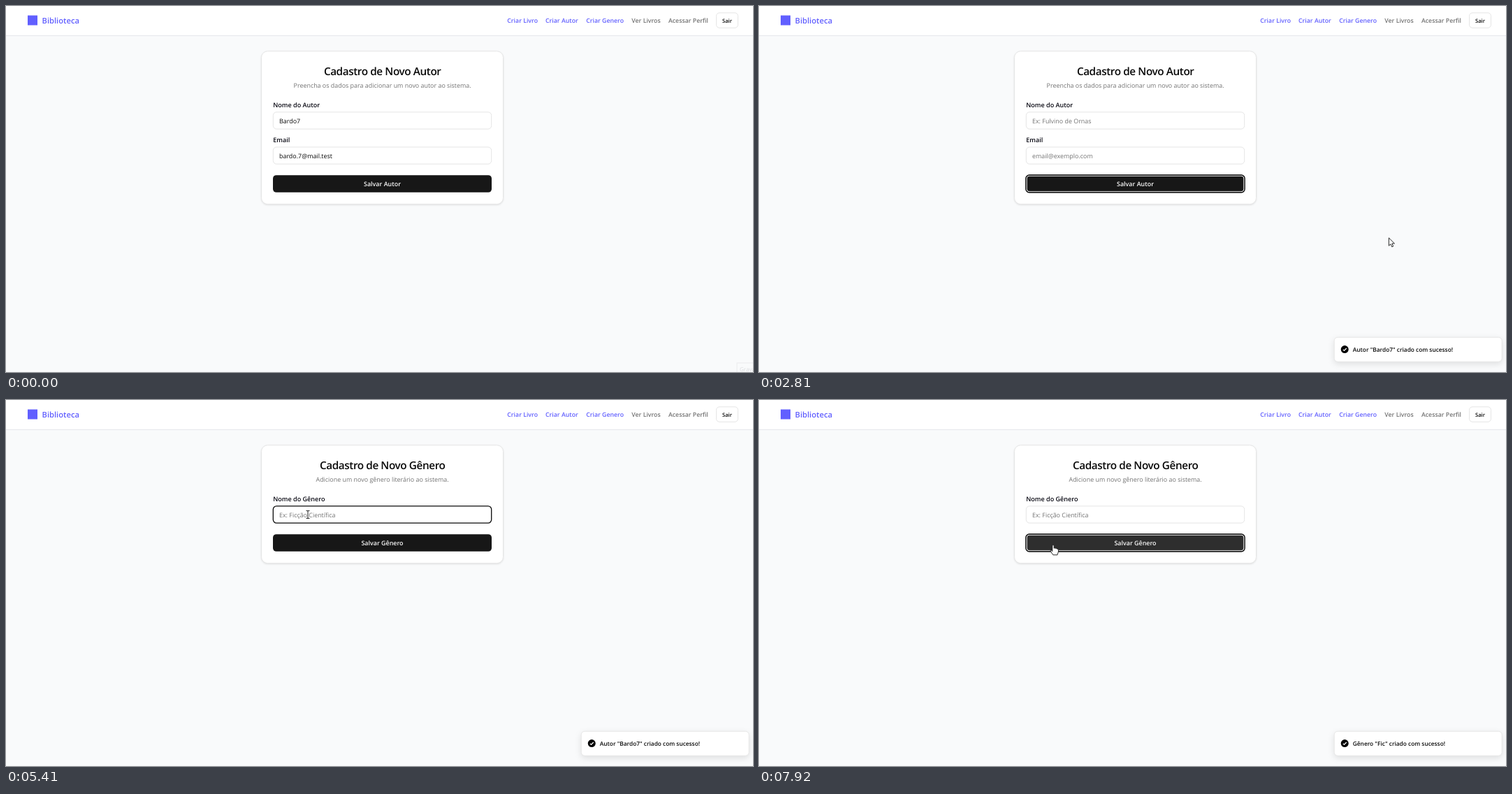
Write an HTML page that moves like this. It is 1069 px wide and 524 px high and loops after 7990 ms.

```html
<!DOCTYPE html>
<html lang="pt-BR">
<head>
<meta charset="utf-8">
<title>Biblioteca</title>
<style>
  html, body { margin: 0; width: 100%; height: 100%; overflow: hidden; background: #f9fafb; }
  svg { display: block; width: 1069px; height: 524px; }
  text {
    font: 400 8.92px "Open Sans", "Noto Sans", sans-serif;
    fill: #0a0a0a; text-rendering: geometricPrecision;
  }
  .bold, .nav text { font-weight: 600; }
  .mid { text-anchor: middle; }
  .brand { font-size: 11.2px; font-weight: 600; fill: #615fff; }
  .nav text { font-size: 8.75px; fill: #737373; }
  .nav .admin { fill: #615fff; }
  .nav .admin.hover { fill: #0a0a0a; }
  .nav .exit { font-size: 7.65px; fill: #0a0a0a; }
  .title { font-size: 15.3px; font-weight: 600; letter-spacing: -.41px; }
  .muted, .hint { fill: #737373; }
  .label { font-size: 9.05px; font-weight: 600; fill: #0a0a14; }
  .box { fill: #fff; stroke: #e5e5e5; }
  .box.focus { stroke: #0a0a0a; stroke-width: 1.3; }
  .card { filter: drop-shadow(0 1px 1.2px rgba(0, 0, 0, .1)); }
  .button { fill: #171717; }
  .button.hover { fill: #2e2e2e; }
  .light { fill: #fafafa; }
  .toast rect { filter: drop-shadow(0 3px 4px rgba(0, 0, 0, .1)); }
  .toast text, .popup text { font-size: 8.32px; font-weight: 600; }
  .popup { fill: #1c1b22; }
  .popup text { fill: #fbfbfe; }
  .status text { font-size: 7.64px; fill: #fbfbfe; }
  .tip rect { fill: #f9fafb; stroke: #ebecee; }
  .tip text { font-size: 8px; fill: #dcdde0; }
  .pointer path { fill: #fff; stroke: #111; stroke-width: .9; stroke-linejoin: round; }
  .pointer .beam { fill: none; stroke: #333; stroke-width: 1.1; }
</style>
</head>
<body>
<svg viewBox="0 0 1069 524">
  <rect width="1069" height="524" fill="#f9fafb"/>
  <rect width="1069" height="42" fill="#fff"/>
  <path d="M0 42.4H1069" stroke="#e5e7eb"/>
  <rect x="31" y="13.5" width="14" height="14" fill="#615fff"/>
  <text class="brand" x="51.5" y="24.8">Biblioteca</text>
  <g class="nav">
    <text class="admin" x="717.3" y="23.7">Criar Livro</text>
    <text class="admin" x="772" y="23.7">Criar Autor</text>
    <text class="admin" id="link" x="830.2" y="23.7">Criar Genero</text>
    <text x="895.3" y="23.7">Ver Livros</text>
    <text x="948" y="23.7">Acessar Perfil</text>
    <rect class="box" x="1016.5" y="9.8" width="31" height="21.5" rx="4.5"/>
    <text class="exit mid" x="1032" y="23.5">Sair</text>
  </g>

  <rect class="box card" id="card" x="365.5" y="64.7" width="346" height="219" rx="9"/>
  <text class="title mid" id="title" x="538.7" y="98.6"></text>
  <text class="muted mid" id="sub" x="538.6" y="117.2"></text>
  <text class="label" id="label" x="382.2" y="145"></text>
  <rect class="box" id="field" x="382.3" y="151.9" width="312.4" height="24.2" rx="4.8"/>
  <text id="value" x="391" y="167.8"></text>
  <rect id="caret" y="158" width="1" height="13"/>
  <g id="email">
    <text class="label" x="382.2" y="195">Email</text>
    <rect class="box" x="382.3" y="202" width="312.4" height="24.2" rx="4.8"/>
    <text id="mail" x="391" y="218"></text>
  </g>
  <g id="save">
    <rect class="button" id="button" x="382" y="242.2" width="313" height="24.6" rx="4.8"/>
    <g id="ring" fill="none">
      <rect x="383" y="243.2" width="311" height="22.6" rx="4" stroke="#fff" stroke-width="1.3"/>
      <rect x="381.8" y="242" width="313.4" height="25" rx="5" stroke="#0a0a0a" stroke-width="1.3"/>
    </g>
    <text class="bold mid light" id="action" x="538.5" y="257.8"></text>
  </g>

  <g class="popup" id="popup">
    <path d="M457 182.5l6-5.5 6 5.5z"/>
    <rect id="list" x="449" y="182" width="106" height="54.5" rx="2"/>
    <text x="457.3" y="200.2">Ficção Científica</text>
    <text x="457.3" y="224.8">Ficção CC</text>
  </g>

  <g class="toast" id="toast">
    <rect class="box" x="823.2" y="474.3" width="240" height="35" rx="5"/>
    <circle cx="838.2" cy="491.6" r="5.5"/>
    <path d="M835.8 491.8l1.7 1.7 3.2-3.5" fill="none" stroke="#fff" stroke-width="1.2"/>
    <text id="notice" x="849.8" y="495.4"></text>
  </g>

  <g class="status" id="status">
    <rect y="512" width="107" height="12" rx="1" fill="#1c1c22"/>
    <text x="1" y="521.8">localhost:5173/generos/criar</text>
  </g>
  <g class="tip" id="tip">
    <rect x="1046" y="511" width="40" height="20"/>
    <text x="1050" y="523.2">Gravar</text>
  </g>

  <g class="pointer" id="pointer">
    <circle id="click" r="8.2" fill="#f5e800" opacity=".55"/>
    <path id="arrow" d="M.5.3V11.6l2.6-2.4 1.8 4 1.9-.8-1.8-4h3.6z"/>
    <path id="hand" d="M-1.2 1.5Q0-.6 1.2 1.5V5.2Q2.5 4.3 3.5 5.6 4.6 4.8 5.6 6.2 7.2 5.7 7.4 7.6V10.3L6 14.8H-.2L-3.7 9.6Q-4.4 7.6-2.6 8L-1.2 9.6z"/>
    <path id="beam" class="beam" d="M-2.5-5.5H-.8L0-4.8.8-5.5H2.5M0-4.8V4.8M-2.5 5.5H-.8L0 4.8.8 5.5H2.5"/>
  </g>
</svg>

<script>
const LOOP = 7990, TICK = 830 / 12;
const el = Object.fromEntries([...document.querySelectorAll('[id]')].map(e => [e.id, e]));

// time, x, y
const path = [
  [390, 988, 499], [460, 915, 460], [670, 589, 318], [800, 589, 318], [1220, 585.5, 258],
  [1800, 585.5, 258], [2330, 560, 133], [2470, 530, 64], [2540, 515, 68], [2810, 900, 328],
  [2950, 924, 430], [3160, 911, 481], [3230, 908, 472], [3850, 862, 14], [3990, 857, 24],
  [4370, 857, 24], [4800, 432, 164], [6400, 432, 164], [6750, 394, 198],
  [6850, 394, 198], [7040, 421, 207], [LOOP, 421, 207]
];

const pages = {
  author: {
    title: 'Cadastro de Novo Autor',
    sub: 'Preencha os dados para adicionar um novo autor ao sistema.',
    label: 'Nome do Autor', action: 'Salvar Autor', hint: 'Ex: Fulvino de Ornas'
  },
  genre: {
    title: 'Cadastro de Novo Gênero',
    sub: 'Adicione um novo gênero literário ao sistema.',
    label: 'Nome do Gênero', action: 'Salvar Gênero', hint: 'Ex: Ficção Científica'
  }
};

const within = (t, a, b) => t >= a && t < b;
const clamp = v => Math.min(1, Math.max(0, v));
const ease = p => 1 - (1 - p ** 1.3) ** 2.5;
const show = (e, on) => e.style.display = on ? '' : 'none';
const set = (e, s) => { if (e.textContent !== s) e.textContent = s; };
const fill = (e, value, hint) => {
  set(e, value || hint);
  e.classList.toggle('hint', !value);
};

function pointAt(t) {
  const i = path.findIndex(p => p[0] > t);
  if (i < 1) return path[i < 0 ? path.length - 1 : 0].slice(1);
  const [a, b] = [path[i - 1], path[i]];
  const k = (t - a[0]) / (b[0] - a[0]);
  return [a[1] + (b[1] - a[1]) * k, a[2] + (b[2] - a[2]) * k];
}

function drawForm(t, genre, x, y) {
  const page = genre ? pages.genre : pages.author;
  for (const key of ['title', 'sub', 'label', 'action']) set(el[key], page[key]);
  const typed = within(t, 5610, 7250) ? 'Fic'.slice(0, t < 5810 ? 1 : t < 5940 ? 2 : 3) : '';
  const sent = t >= 1850;
  fill(el.value, genre ? typed : sent ? '' : 'Bardo7', page.hint);
  fill(el.mail, sent ? '' : 'bardo.7@mail.test', 'email@exemplo.com');
  show(el.email, !genre);
  el.card.setAttribute('height', genre ? 169 : 219);

  const lift = genre ? 50 : 0;
  const inX = within(x, 382, 695);
  const onButton = t >= 390 && inX && within(y, 242 - lift, 267 - lift);
  const onField = inX && (within(y, 152, 176) || !genre && within(y, 202, 226));
  el.save.setAttribute('transform', `translate(0 ${-lift})`);
  el.button.classList.toggle('hover', onButton);
  show(el.ring, within(t, 1565, 4130) || t >= 7175);

  el.field.classList.toggle('focus', within(t, 4935, 7175));
  el.caret.setAttribute('x', [391, 395.3, 397.6, 402][typed.length]);
  show(el.caret, within(t, 4935, 5410) || within(t, 5610, 6440) || within(t, 6900, 7175));
  show(el.popup, within(t, 5610, 7175));
  el.list.setAttribute('height', t < 6335 ? 153.5 : 54.5);
  return { onButton, onField };
}

function drawToast(q) {
  const second = q > 7000;
  const enter = ease(clamp((q - (second ? 7240 : 1900)) / 400));
  const leave = second ? 0 : ease(clamp((q - 6290) / 400));
  set(el.notice, second ? 'Gênero "Fic" criado com sucesso!' : 'Autor "Bardo7" criado com sucesso!');
  el.toast.setAttribute('transform', `translate(0 ${36 * (1 - enter + leave)})`);
  el.toast.setAttribute('opacity', enter * (1 - leave));
}

function draw(t) {
  const q = 1570 + Math.floor((t - 1560) / TICK) * TICK;
  const [x, y] = pointAt(q);
  const genre = t >= 4335;
  const { onButton, onField } = drawForm(t, genre, x, y);
  drawToast(q);

  const onLink = within(x, 830, 885) && within(y, 10, 31);
  el.link.classList.toggle('hover', onLink);
  show(el.status, within(t, 4060, 5010));
  el.status.setAttribute('opacity', t < 4800 ? 1 : t < 4865 ? .6 : t < 4935 ? .3 : .1);
  show(el.tip, t < 70);

  show(el.pointer, t >= 390);
  el.pointer.setAttribute('transform', `translate(${x} ${y})`);
  show(el.click, within(t, 1565, 1800) || within(t, 4060, 4335) || within(t, 7175, 7915));
  const hand = onButton || onLink;
  show(el.hand, hand);
  show(el.beam, !hand && onField);
  show(el.arrow, !hand && !onField);
}

const start = performance.now();
function loop() {
  draw((performance.now() - start) % LOOP);
  requestAnimationFrame(loop);
}
loop();
</script>
</body>
</html>
```
